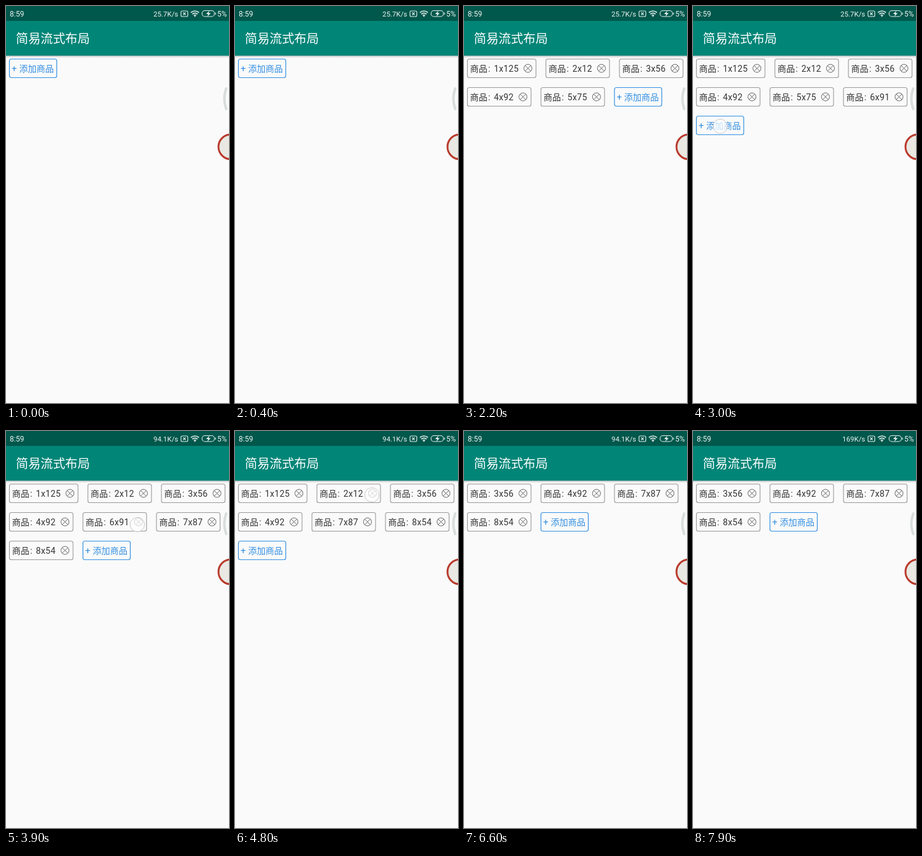
These frames come from a looping animation (360x640 px, 8000 ms). An HTML page:

```html
<!DOCTYPE html>
<html lang="zh-CN">
<head>
<meta charset="utf-8">
<style>
  html, body { margin: 0; width: 100%; height: 100%; overflow: hidden; background: #fafafa; }
  svg { display: block; width: 360px; height: 640px; }
  text { font-family: 'Noto Sans CJK SC', 'Noto Sans CJK', sans-serif; font-size: 14px; }
  .num { font-family: Roboto, 'Noto Sans', sans-serif; }
  .status text { font: 12px Roboto, 'Noto Sans', sans-serif; fill: #eef5f4; }
  .line { fill: none; stroke: #e4efed; stroke-width: 1.1; }
  .chip { fill: #333; }
  .chip rect { fill: none; stroke: #999; stroke-width: 1.1; }
  .chip path { fill: none; stroke: #666; }
  .add { fill: #338fe2; }
  .add rect { fill: none; stroke: #338fe2; stroke-width: 1.2; }
</style>
</head>
<body>
<svg viewBox="0 0 360 640">
  <defs>
    <linearGradient id="shade" x2="0" y2="1">
      <stop stop-color="#8f9a98" stop-opacity=".75"/>
      <stop offset="1" stop-color="#ddd" stop-opacity="0"/>
    </linearGradient>
  </defs>
  <rect width="360" height="640" fill="#fafafa"/>
  <rect y="80" width="360" height="4" fill="url(#shade)"/>
  <rect width="360" height="80" fill="#008577"/>
  <rect width="360" height="24" fill="#00574b"/>

  <g class="status">
    <text x="6" y="17">8:59</text>
    <text id="speed" x="278" y="17" text-anchor="end" style="font-size:11.4px"></text>
    <text x="341" y="17">5%</text>
    <g class="line">
      <rect x="282.5" y="8" width="11" height="9" rx="2"/>
      <path d="M286 10.5l4 4m0-4l-4 4"/>
      <path d="M298.5 10.5q6.5-5 13 0M300.7 13q4.3-3.2 8.6 0M303 15.2q2-1.4 4 0" stroke-width="1.6"/>
      <rect x="316.5" y="7.5" width="20" height="9.5" rx="4.5"/>
      <path d="M338.3 10.5v3.5"/>
    </g>
    <path d="M328.5 7.5l-5.5 5.500h3.500l-1.500 4 5.500-5.500h-3.500z" fill="#eef5f4"/>
    <circle cx="305" cy="16.5" r="1" fill="#eef5f4"/>
  </g>
  <text x="16" y="60" style="font-size:19.9px" fill="#fff">简易流式布局</text>

  <g id="chips"></g>
  <path d="M355.5 133q-6 16 0 33" fill="none" stroke="#d9dddb" stroke-width="4" stroke-linecap="round"/>
  <circle cx="363" cy="227" r="20" fill="#e9e8e2" stroke="#b93a2c" stroke-width="3"/>
  <circle id="touch" r="11.5" fill="#fff" fill-opacity=".7" stroke="#bbb" stroke-opacity=".8"/>
</svg>
<script>
const $ = id => document.getElementById(id);
const LOOP = 8000, GAP = 15, ROW = 46, PRESS = 150;
const amounts = [125, 12, 56, 92, 75, 91, 87, 54];

// release time, item to remove (0 adds the next one), finger x, y
const taps = [
  [1400, 0, 47, 102], [1890, 0, 170, 102], [1990, 0, 288, 102],
  [2090, 0, 44, 148], [2190, 0, 162, 148], [2850, 0, 281, 148],
  [3100, 0, 44, 194], [3350, 0, 162, 194], [3700, 5, 212, 150],
  [4000, 6, 212, 151], [4900, 2, 221, 103], [6000, 1, 103, 103]
];

function itemsAt(time) {
  let items = [], next = 1;
  for (const [at, id] of taps) {
    if (at > time) break;
    if (id) items = items.filter(item => item !== id);
    else items.push(next++);
  }
  return items;
}

const frame = width => `<rect x=".5" y=".5" width="${width - 1}" height="30" rx="3"/>`;

const itemChip = (id, width) => frame(width) +
  `<text x="4.8" y="21">商品</text><text class="num" x="34" y="21">:</text>` +
  `<text class="num" x="43.3" y="21" letter-spacing=".35">${id}x${amounts[id - 1]}</text>` +
  `<path d="M${width - 20} 15.5a6.5 6.5 0 1 0 13 0a6.5 6.5 0 1 0-13 0m2-4.500l9 9m0-9l-9 9"/>`;

const addChip = width => frame(width) +
  `<text class="num" x="4" y="21" style="font-size:15px">+</text><text x="16.2" y="21">添加商品</text>`;

// Flow layout: wrap when the next chip would cross the right edge.
function layout(items) {
  let x = 5, y = 85;
  return [...items, 0].map(id => {
    const width = !id ? 77.4 : amounts[id - 1] > 99 ? 111.7 : 103.7;
    if (x + width > 355) { x = 5; y += ROW; }
    const chip = `<g class="${id ? 'chip' : 'add'}" transform="translate(${x} ${y})">` +
      (id ? itemChip(id, width) : addChip(width)) + '</g>';
    x += width + GAP;
    return chip;
  }).join('');
}

let shown;
function draw(now) {
  const time = now % LOOP;
  const items = itemsAt(time);
  if (shown !== items.join()) {
    shown = items.join();
    $('chips').innerHTML = layout(items);
  }
  $('speed').textContent = time < 3250 ? '25.7K/s' : time < 6800 ? '94.1K/s' : '169K/s';

  const tap = taps.find(([at]) => time >= at - PRESS && time < at);
  $('touch').setAttribute('opacity', tap ? 1 : 0);
  if (tap) $('touch').setAttribute('transform', `translate(${tap[2]} ${tap[3]})`);
  requestAnimationFrame(() => draw(performance.now() - start));
}
const start = performance.now();
draw(0);
</script>
</body>
</html>
```
